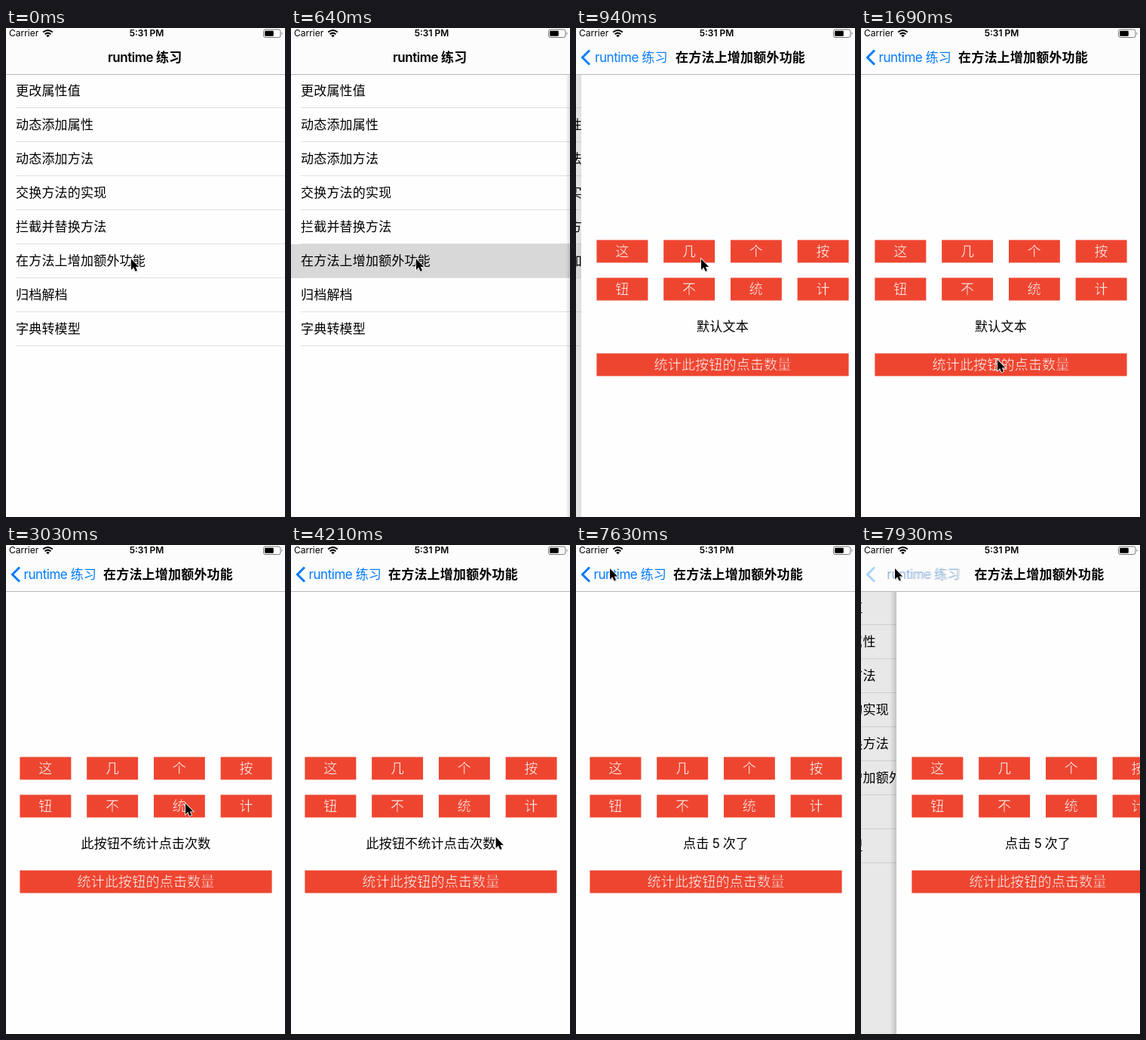
An HTML page that plays this animation: 370 by 647 pixels, repeating every 8000 ms.

```html
<!DOCTYPE html>
<html lang="zh-CN">
<head>
<meta charset="utf-8">
<title>runtime 练习</title>
<style>
html, body { margin: 0; width: 100%; height: 100%; overflow: hidden; background: #fefefe; }
#stage {
  position: absolute; left: 0; top: 0; width: 370px; height: 647px; overflow: hidden;
  background: #fefefe; color: #000;
  font: 17px/45px Inter, "Noto Sans CJK SC", "Noto Sans CJK", sans-serif;
  letter-spacing: .2px; white-space: nowrap;
}
#stage div, #stage svg { position: absolute; }
i { font-style: normal; letter-spacing: -.45px; }

#list, #dim { left: 0; top: 0; width: 370px; height: 647px; }
#dim { background: #000; }
.row { left: 0; width: 370px; height: 45px; text-indent: 13px; }
.row::after {
  content: ""; position: absolute; left: 13px; right: 0; bottom: 0;
  height: 1px; background: #e0e0e0;
}

#detail { left: -2px; top: 0; width: 375px; height: 647px; background: #fefefe; }
#shadow {
  left: -9px; top: 0; width: 9px; height: 100%;
  background: linear-gradient(to right, transparent, rgba(0, 0, 0, .2));
}
.btn {
  height: 31px; background: #ee4530; color: #fff; text-align: center;
  font-size: 18px; font-weight: 300; line-height: 31px;
  -webkit-text-stroke: .45px #ee4530; /* thins the strokes */
  clip-path: inset(.4px);
}
#label { left: 0; top: 373px; width: 375px; text-align: center; }

#nav { left: 0; top: 0; width: 370px; height: 61px; background: #fcfcfc; border-bottom: 1px solid #b8b8b8; }
#nav div { top: 17px; }
.bold { font-weight: 600; }
#back { color: #007aff; }
#status { left: 0; top: 0; }
#cursor { left: -3px; top: -3px; }
</style>
</head>
<body>
<div id="stage">
  <div id="list"></div>
  <div id="dim"></div>
  <div id="detail"><div id="shadow"></div><div id="label"></div></div>
  <div id="nav">
    <svg id="chevron" width="24" height="61" fill="none" stroke="#007aff" stroke-width="3">
      <path d="M18 29.5L8.5 39 18 48.5"/>
    </svg>
    <div id="back"><i>runtime </i>练习</div>
    <div id="home" class="bold"><i>runtime </i>练习</div>
    <div id="title" class="bold">在方法上增加额外功能</div>
    <svg id="status" width="370" height="16" font-family="Inter, sans-serif" font-size="12" letter-spacing="0">
      <text x="4" y="11.4">Carrier</text>
      <text x="186.5" y="11.4" text-anchor="middle" font-weight="600">5:31 PM</text>
      <path d="M49.2 5.6Q55.5 .4 61.8 5.6M51.6 8.2Q55.5 5 59.4 8.2" fill="none" stroke="#000" stroke-width="2"/>
      <path d="M53.2 9.9Q55.5 8.2 57.8 9.9L55.5 12.3Z"/>
      <rect x="341.5" y="2" width="22.5" height="10.5" rx="2.5" fill="none" stroke="#777"/>
      <rect x="343.2" y="3.7" width="11.6" height="7.1" rx="1"/>
      <path d="M365.6 5.3Q367.6 7.2 365.6 9.2Z" fill="#777"/>
    </svg>
  </div>
  <svg id="cursor" width="18" height="24" viewBox="-3 -3 18 24">
    <path d="M1 1.5V16L4.2 13 6.4 18 9 17 6.8 12H11.2Z" opacity=".2"/>
    <path d="M0 0V14.4L3.3 11.3 5.5 16.4 8 15.3 5.8 10.4H10.2Z" stroke="#fff" stroke-width="1.6" paint-order="stroke"/>
  </svg>
</div>
<script>
const LOOP = 8000, WIDTH = 375;
const FIRST = 490, STEP = 148.7;
const PUSH = 638, POP = 7892;
const $ = id => document.getElementById(id);
const clamp = v => Math.max(0, Math.min(1, v));
const ease = v => v * v * (3 - 2 * v);

function add(parent, cls, text, box) {
  const el = document.createElement('div');
  el.className = cls;
  el.textContent = text;
  for (const k in box) el.style[k] = box[k] + 'px';
  return parent.appendChild(el);
}

const rows = ['更改属性值', '动态添加属性', '动态添加方法', '交换方法的实现',
  '拦截并替换方法', '在方法上增加额外功能', '归档解档', '字典转模型']
  .map((s, i) => add($('list'), 'row', s, { top: 61 + 45 * i }));

[...'这几个按钮不统计'].forEach((s, i) => add($('detail'), 'btn', s,
  { left: 20 + i % 4 * 88.75, top: 280 + (i >> 2) * 50, width: 68.75 }));
add($('detail'), 'btn', '统计此按钮的点击数量', { left: 20, top: 430, width: 335 });

// Critically damped spring falling from 1 to 0
function spring(t) {
  const w = Math.max(0, t) * .0189;
  return (1 + w) * Math.exp(-w);
}

function labelAt(t) {
  if (t < 2570) return '默认文本';
  const n = Math.min(5, Math.floor((t - 4790) / 523) + 1);
  return n < 1 ? '此按钮不统计点击次数' : `点击<i> ${n} </i>次了`;
}

// Pointer moves between rests
const moves = [
  { from: 1240, to: 1800, x: 183, y: 457 },
  { from: 1820, to: 2270, x: 133, y: 344 },
  { from: 2600, to: 3015, x: 238, y: 342 },
  { from: 3350, to: 3610, x: 316, y: 344 },
  { from: 3950, to: 4500, x: 218, y: 438 },
  { from: 6890, to: 7620, x: 45, y: 31 }
];
function pointerAt(t) {
  let x = 166, y = 305.5;
  for (const m of moves) {
    const k = ease(clamp((t - m.from) / (m.to - m.from)));
    x += (m.x - x) * k;
    y += (m.y - y) * k;
  }
  return `translate(${x}px, ${y}px)`;
}

const moveX = (id, x) => { $(id).style.transform = `translateX(${x}px)`; };
const fade = (id, v) => { $(id).style.opacity = clamp(v); };
let shown;

function draw(time) {
  const t = FIRST + Math.floor((time - FIRST) / STEP) * STEP;
  const off = Math.round(WIDTH * (t < POP ? spring(t - PUSH) : 1 - spring(t - POP)));
  const p = off / WIDTH, e = p ** 1.15;

  const lit = t >= FIRST && t < POP;
  rows[5].style.background = lit ? `rgba(0, 0, 0, ${.05 + .1 * p})` : 'none';
  moveX('list', -111 * (1 - p));
  fade('dim', .1 * (1 - p));
  $('detail').style.visibility = t < PUSH ? 'hidden' : 'visible';
  moveX('detail', off);
  fade('shadow', 6 * p);

  moveX('back', 23.5 + 111.5 * e);
  moveX('home', 23.5 + 111.5 * e);
  moveX('title', 129 + 223 * e);
  fade('back', 1.1 - 6 * p);
  fade('chevron', 1.1 - 6 * p);
  fade('home', e);
  fade('title', 1.6 - 2 * p);

  const text = labelAt(t);
  if (text !== shown) $('label').innerHTML = shown = text;
  $('cursor').style.transform = pointerAt(t);
}

const start = performance.now();
function tick() {
  draw((performance.now() - start) % LOOP);
  requestAnimationFrame(tick);
}
tick();
</script>
</body>
</html>
```
